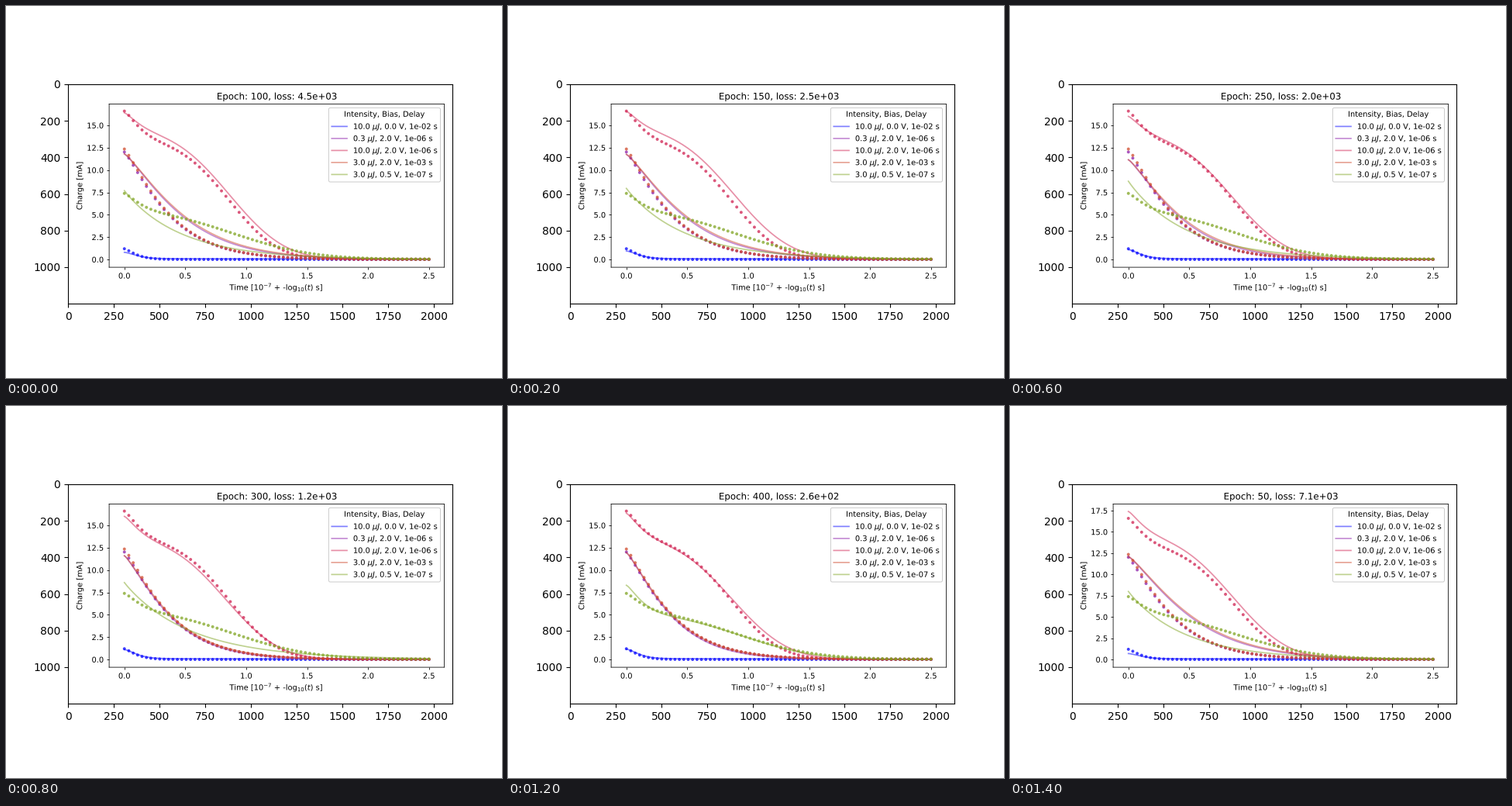
Recreate the animation shown at these times as a matplotlib script. Size 640x480 px, loop 1600 ms.

```python
import matplotlib.pyplot as plt
import numpy as np
from matplotlib.animation import FuncAnimation
from matplotlib.axes import Axes
from matplotlib.patches import FancyBboxPatch
from matplotlib.patheffects import Normal
from matplotlib.text import Text
from matplotlib.ticker import MultipleLocator

W, H, DPI = 640, 480, 100
K = 496 / 700  # scale of the embedded plot's type and strokes

COLORS = ["#0000ff", "#8c1eaa", "#d02050", "#d04a2c", "#80a523"]
LABELS = [
    r"10.0 $\mu J$, 0.0 V, 1e-02 s",
    r"0.3 $\mu J$, 2.0 V, 1e-06 s",
    r"10.0 $\mu J$, 2.0 V, 1e-06 s",
    r"3.0 $\mu J$, 2.0 V, 1e-03 s",
    r"3.0 $\mu J$, 0.5 V, 1e-07 s",
]
EPOCHS = [100, 150, 200, 250, 300, 350, 400, 50]
LOSSES = [4.5e3, 2.5e3, 1.6e3, 2.0e3, 1.2e3, 6.4e2, 2.6e2, 7.1e3]

# Fit parameters at key epochs
KEY_EPOCHS = [50, 100, 200, 250, 300, 400]
BLUE_START = [.7, .8, 1.1, 1.1, 1.1, 1.15]
PURPLE_START = [12.1, 11.8, 11.7, 11.15, 11.6, 11.95]
PURPLE_TAU = [.565, .525, .525, .48, .42, .405]
CRIMSON_DROP = [3.2, 2.4, 2.4, 2.5, 3.0, 3.25]
CRIMSON_BODY = [14.2, 14.0, 14.3, 13.5, 13.0, 13.1]
CRIMSON_TAU = [.99, .995, 1.04, .985, .96, 1.0]
GREEN_START = [8.0, 7.7, 8.2, 8.75, 8.6, 8.3]
GREEN_TAU = [.47, .475, .5, .49, .55, .55]


def decay(t, start, tau, power):
    return start * np.exp(-(t / tau) ** power)


def two_stage(t, drop, body, tau, power):
    """A quick initial drop on top of a slow shoulder."""
    return decay(t, drop, .16, 1.3) + decay(t, body, tau, power)


def measured(t):
    fast = decay(t, 12.2, .409, 1.17)
    return [
        decay(t, 1.2, .12, 1.3),
        fast * .985,
        two_stage(t, 3.55, 13, .97, 3.2) + .04,
        fast + .15 * np.exp(-t / .4),
        two_stage(t, 2.15, 5.2, 1.115, 2.35) + .04,
    ]


def model(t, epoch):
    def at(values):
        return np.interp(epoch, KEY_EPOCHS, values)

    blue = decay(t, at(BLUE_START) - .1, .13, 1.5) + .1 * (1 - t / 4)
    purple = decay(t, at(PURPLE_START), at(PURPLE_TAU), 1.22)
    crimson = two_stage(t, at(CRIMSON_DROP), at(CRIMSON_BODY), at(CRIMSON_TAU), 2.9)
    orange = purple + .36 * t * np.exp(1 - 2 * t)
    learned = np.clip((epoch - 300) / 100, 0, 1)
    green = ((1 - learned) * decay(t, at(GREEN_START), at(GREEN_TAU), .97)
             + learned * two_stage(t, 3.4, 4.9, 1.14, 2.6))
    return [blue, purple, crimson, orange, green]


class SmoothAxes(Axes):
    """Axes drawn off the pixel grid, with unhinted text."""

    def draw(self, renderer):
        self.get_xticklabels(), self.get_yticklabels()
        for artist in self.findobj():
            artist.set_snap(False)
            if isinstance(artist, Text):
                artist.set_path_effects([Normal()])
        with plt.rc_context({"text.hinting": "none"}):
            super().draw(renderer)


def axes_at(left, top, right, bottom, kind=Axes):
    return fig.add_axes([left / W, 1 - bottom / H, (right - left) / W,
                         (bottom - top) / H], axes_class=kind)


def draw_legend():
    page = axes_at(0, 0, W, H, SmoothAxes)
    page.set(xlim=(0, W), ylim=(H, 0))
    page.axis("off")
    page.add_patch(FancyBboxPatch(
        (416.4, 131.4), 144.1, 95.6, boxstyle="round,pad=0,rounding_size=2",
        fc="white", ec="0.8", lw=K))
    page.text(488.4, 142.8, "Intensity, Bias, Delay", ha="center")
    for row, (color, label) in enumerate(zip(COLORS, LABELS)):
        baseline = 158.8 + 15.5 * row
        page.plot([420.3, 440], [baseline - 3.4] * 2, color=color, **STROKE)
        page.text(447.9, baseline, label)


fig = plt.figure(figsize=(W / DPI, H / DPI), dpi=DPI, facecolor="white")

frame = axes_at(80, 100.7, 576, 384.1)
frame.set(xlim=(-.5, 2099.5), ylim=(1199.5, -.5),
          xticks=range(0, 2001, 250), yticks=range(0, 1001, 200))

plt.rcParams.update({
    "font.size": 10 * K, "axes.linewidth": .8 * K,
    "axes.titlepad": 6 * K, "axes.labelpad": 4 * K,
    **{f"{axis}tick.major.{name}": size * K for axis in "xy"
       for name, size in (("size", 3.5), ("pad", 3.5), ("width", .8))},
})
STROKE = dict(alpha=.5, lw=1.75 * K)

plot = axes_at(133.1, 126.5, 565.4, 337.1, SmoothAxes)
t_dots, t_line = np.linspace(0, 2.5, 70), np.linspace(0, 2.5, 200)
lines = []
for color, dots in zip(COLORS, measured(t_dots)):
    lines += plot.plot([], [], color=color, **STROKE)
    plot.scatter(t_dots, dots, s=(4 * K) ** 2, color=color, alpha=.75,
                 edgecolors="none", zorder=2)
plot.set_xlim(-.125, 2.625)
plot.xaxis.set_major_locator(MultipleLocator(.5))
plot.yaxis.set_major_locator(MultipleLocator(2.5))
plot.xaxis.set_major_formatter("{x:.1f}")
plot.yaxis.set_major_formatter("{x:.1f}")
plot.set_xlabel(r"Time [10$^{-7}$ + -log$_{10}$($t$) s]", labelpad=2 * K)
plot.set_ylabel("Charge [mA]")
draw_legend()


def update(i):
    curves = model(t_line, EPOCHS[i])
    for line, values in zip(lines, curves):
        line.set_data(t_line, values)
    low, high = -.04, max(16.55, curves[2][0])
    margin = .05 * (high - low)
    plot.set_ylim(low - margin, high + margin)
    plot.set_title(f"Epoch: {EPOCHS[i]}, loss: {LOSSES[i]:.1e}")
    return lines


anim = FuncAnimation(fig, update, frames=len(EPOCHS), interval=200,
                     repeat=True, repeat_delay=0, blit=False)
plt.show()
```
